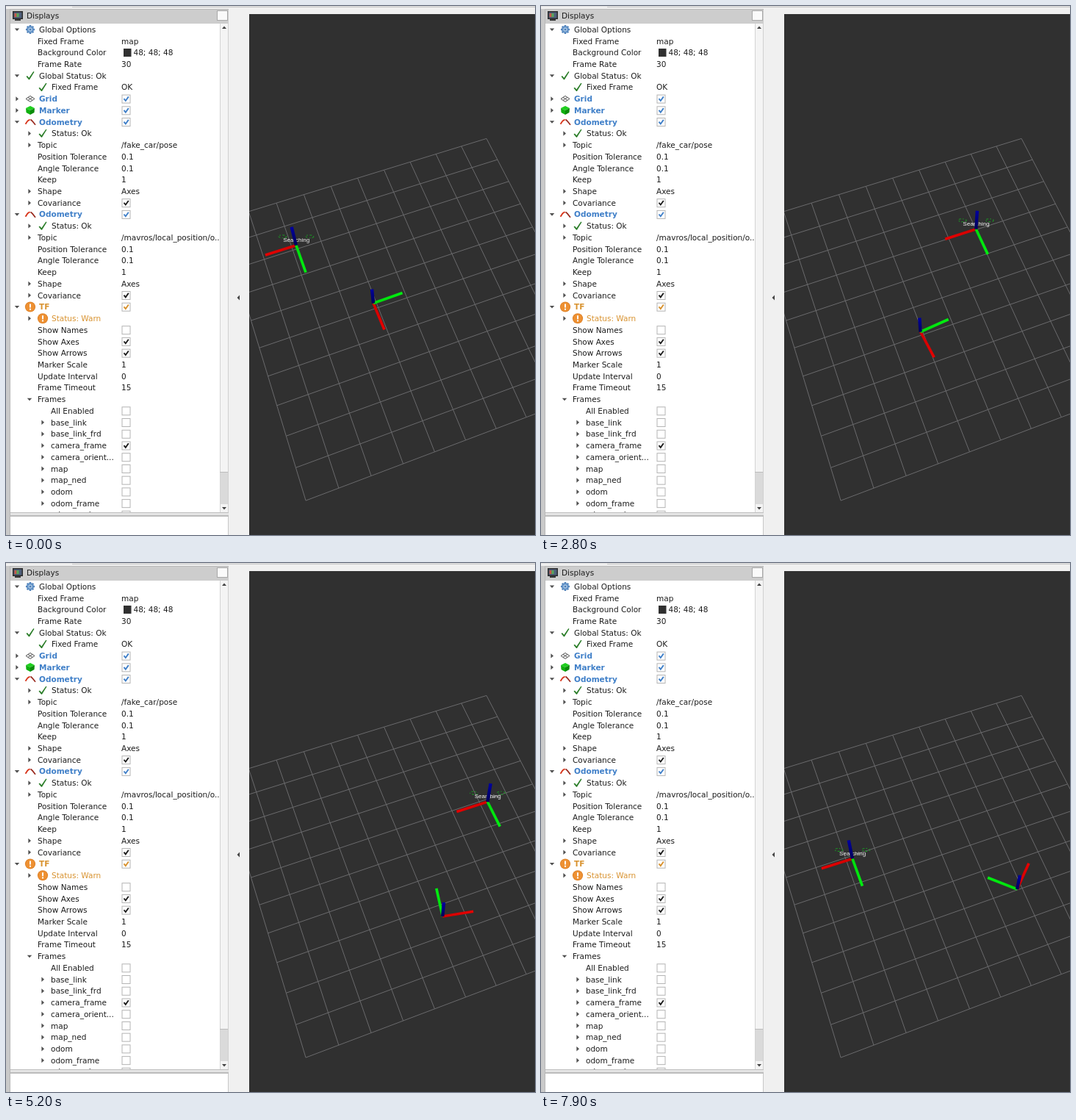
These frames come from a looping animation (720 by 720 pixels, 8 s). An HTML page with a canvas:

```html
<!DOCTYPE html>
<html lang="en">
<head>
<meta charset="utf-8">
<title>Displays</title>
<style>
html, body { margin: 0; width: 100%; height: 100%; overflow: hidden; background: #f0f0f0; }
canvas { position: absolute; left: 0; top: 0; width: 720px; height: 720px; }
</style>
</head>
<body>
<canvas id="back" width="720" height="720"></canvas>
<canvas id="scene" width="720" height="720"></canvas>
<script>
const back = document.getElementById('back').getContext('2d');
const scene = document.getElementById('scene').getContext('2d');
const FONT = '10.5px "DejaVu Sans", sans-serif';
const VIEW = { x: 331, y: 11, w: 389, h: 709 };
const LOOP = 8000, STEP = 100;

function rect(c, x, y, w, h, fill) { c.fillStyle = fill; c.fillRect(x, y, w, h); }
function poly(c, pts, fill) {
  c.beginPath();
  pts.forEach(p => c.lineTo(p[0], p[1]));
  c.closePath();
  c.fillStyle = fill;
  c.fill();
}
function line(c, pts, color, width) {
  c.beginPath();
  pts.forEach(p => c.lineTo(p[0], p[1]));
  c.strokeStyle = color;
  c.lineWidth = width;
  c.stroke();
}
function disc(c, x, y, r, fill) {
  c.beginPath();
  c.arc(x, y, r, 0, 7);
  c.fillStyle = fill;
  c.fill();
}

// ---- property tree ----
const BLUE = '#3f7fc8', ORANGE = '#d8922f', BLACK = '#1c1c1c';
const odometry = topic => [
  ['v', 45, 'path', 'Odometry', BLUE],
  ['>', 62, 'tick', 'Status: Ok'],
  ['>', 43, '', 'Topic', topic],
  ['', 43, '', 'Position Tolerance', '0.1'],
  ['', 43, '', 'Angle Tolerance', '0.1'],
  ['', 43, '', 'Keep', '1'],
  ['>', 43, '', 'Shape', 'Axes'],
  ['>', 43, '', 'Covariance', true]
];
// arrow, text x, icon, label, value (a colour marks a display heading)
const rows = [
  ['v', 45, 'gear', 'Global Options'],
  ['', 43, '', 'Fixed Frame', 'map'],
  ['', 43, '', 'Background Color', '48; 48; 48'],
  ['', 43, '', 'Frame Rate', '30'],
  ['v', 45, 'tick', 'Global Status: Ok'],
  ['', 62, 'tick', 'Fixed Frame', 'OK'],
  ['>', 45, 'grid', 'Grid', BLUE],
  ['>', 45, 'cube', 'Marker', BLUE],
  ...odometry('/fake_car/pose'),
  ...odometry('/mavros/local_position/o..'),
  ['v', 45, 'warn', 'TF', ORANGE],
  ['>', 62, 'warn', 'Status: Warn'],
  ['', 43, '', 'Show Names', false],
  ['', 43, '', 'Show Axes', true],
  ['', 43, '', 'Show Arrows', true],
  ['', 43, '', 'Marker Scale', '1'],
  ['', 43, '', 'Update Interval', '0'],
  ['', 43, '', 'Frame Timeout', '15'],
  ['v', 43, '', 'Frames'],
  ['', 61, '', 'All Enabled', false],
  ...['base_link', 'base_link_frd', 'camera_frame', 'camera_orient...', 'map',
    'map_ned', 'odom', 'odom_frame', 'odom_ned'].map(n => ['>', 61, '', n, n === 'camera_frame'])
];

const icons = {
  gear(c) {
    for (let i = 0; i < 8; i++) {
      const a = i * Math.PI / 4;
      line(c, [[0, 0], [6 * Math.cos(a), 6 * Math.sin(a)]], '#4c7cb4', 2.4);
    }
    disc(c, 0, 0, 5, '#5f90c6');
    disc(c, 0, 0, 2.7, '#a9c6e4');
    disc(c, 0, 0, 1.3, '#4c7cb4');
  },
  tick(c) { poly(c, [[-5.5, 1], [-4, 0], [-1.7, 2.8], [4.3, -5.8], [5.5, -5.2], [-1, 5.3], [-2, 5.3]], '#2a7d28'); },
  grid(c) {
    for (let i = -1; i <= 1; i++) {
      line(c, [[-3 + i * 3, i * 2 + 2], [3 + i * 3, i * 2 - 2]], '#505050', 1);
      line(c, [[-3 + i * 3, -i * 2 - 2], [3 + i * 3, 2 - i * 2]], '#505050', 1);
    }
  },
  cube(c) {
    poly(c, [[-6, -3], [0, -6], [6, -3], [0, 0]], '#1fd01f');
    poly(c, [[-6, -3], [0, 0], [0, 6], [-5.5, 3]], '#10b010');
    poly(c, [[6, -3], [0, 0], [0, 6], [5.5, 3]], '#0a8c0a');
  },
  path(c) {
    line(c, [[-6.5, 3], [-3.5, -1.5], [-.5, -3.4]], '#d8361c', 1.9);
    line(c, [[.5, -3.4], [3, -1], [7, 4]], '#98281c', 1.7);
  },
  warn(c) {
    disc(c, 0, 0, 7.1, '#e0842a');
    disc(c, 0, 0, 6, '#ee9133');
    rect(c, -1, -4, 2, 5, '#fff');
    rect(c, -1, 2.2, 2, 2, '#fff');
  }
};

function arrow(c, kind, x, y) {
  poly(c, kind === 'v' ? [[x - 3.2, y - 1.6], [x + 3.2, y - 1.6], [x, y + 2]]
    : [[x - 1.6, y - 3.2], [x + 2, y], [x - 1.6, y + 3.2]], '#505050');
}
function checkbox(c, y, on, color) {
  rect(c, 157.5, y - 5.8, 12, 12, '#b4b4b4');
  rect(c, 158.5, y - 4.8, 10, 10, '#fff');
  if (on) line(c, [[160.5, y - .2], [162.8, y + 2.6], [166.8, y - 3]], color, 1.9);
}
function text(c, s, x, y, color, bold) {
  c.font = (bold ? 'bold ' : '') + FONT;
  c.fillStyle = color;
  c.fillText(s, x, y + 3.8);
}

function drawRow(c, [arr, x, icon, label, value], i) {
  const y = 32 + i * 15.73;
  const heading = value === BLUE || value === ORANGE;
  if (arr) arrow(c, arr, x === 45 ? 15 : x === 61 ? 50 : 32, y);
  if (icon) {
    c.save();
    c.translate(x === 45 ? 33 : 50, y);
    icons[icon](c);
    c.restore();
  }
  text(c, label, x, y, heading ? value : icon === 'warn' ? ORANGE : BLACK, heading);
  if (heading) checkbox(c, y, true, value);
  else if (typeof value === 'boolean') checkbox(c, y, value, BLACK);
  else if (value) {
    const swatch = label === 'Background Color';
    if (swatch) rect(c, 160, y - 5.5, 10.5, 11, '#303030');
    text(c, value, swatch ? 173.5 : 157, y, BLACK);
  }
}

function drawPanel(c) {
  rect(c, 0, 0, 720, 720, '#f0f0f0');
  rect(c, 0, 0, 720, 1, '#e2e2e2');
  rect(c, 90, 1, 630, 1, '#c8c8c8');
  rect(c, 0, 4, 6, 716, '#c9c9c9');
  rect(c, 5, 4, 1, 716, '#b8b8b8');
  // title bar
  rect(c, 6, 4, 297, 20, '#cdcdcd');
  rect(c, 6, 4, 297, 1, '#b8b8b8');
  rect(c, 287, 6, 15, 14, '#a8a8a8');
  rect(c, 288, 7, 13, 12, '#fafafa');
  rect(c, 9, 7, 14, 11, '#2c2c2c');
  rect(c, 10.5, 8.5, 11, 8, '#50607c');
  rect(c, 11.5, 10, 3, 5, '#c85a4a');
  rect(c, 14.5, 10, 3, 5, '#5aa85a');
  rect(c, 12, 18, 8, 2, '#3a3a3a');
  text(c, 'Displays', 28, 13.6, BLACK);
  // tree
  rect(c, 6, 24, 285, 666, '#fff');
  c.save();
  c.beginPath();
  c.rect(6, 24, 285, 665);
  c.clip();
  rows.forEach((r, i) => drawRow(c, r, i));
  c.restore();
  // scrollbar
  rect(c, 291, 24, 12, 666, '#f4f4f4');
  rect(c, 291, 24, 1, 666, '#d4d4d4');
  rect(c, 292, 634, 11, 44, '#dadada');
  rect(c, 291, 634, 12, 1, '#bcbcbc');
  rect(c, 302, 24, 1, 666, '#d0d0d0');
  poly(c, [[294, 31], [300, 31], [297, 27.5]], '#444');
  poly(c, [[294, 682], [300, 682], [297, 685.5]], '#444');
  // lower box
  rect(c, 6, 689, 297, 1, '#c0c0c0');
  rect(c, 6, 690, 297, 3, '#e4e4e4');
  rect(c, 6, 693, 297, 2, '#bcbcbc');
  rect(c, 6, 695, 297, 25, '#fff');
  rect(c, 302, 695, 1, 25, '#c8c8c8');
  poly(c, [[318, 393.5], [318, 400.5], [314.5, 397]], '#444');
  rect(c, VIEW.x, VIEW.y, VIEW.w, VIEW.h, '#303030');
  drawGrid(c);
}

// ---- ground plane in perspective, s and r run from 0 to 1 ----
function ground(s, r) {
  const p = s * .06426, q = r * -.1641, w = 1 + p + q;
  return [(292 + 6287 * p - 299 * q) / w, (291 - 1549 * p - 1653 * q) / w];
}
function clipView(c) {
  c.beginPath();
  c.rect(VIEW.x, VIEW.y, VIEW.w, VIEW.h);
  c.clip();
}
function drawGrid(c) {
  c.save();
  clipView(c);
  c.translate(0, .5);
  for (let i = 0; i <= 10; i++) {
    line(c, [ground(i / 10, 0), ground(i / 10, 1)], '#6a6a6c', 1);
    line(c, [ground(0, i / 10), ground(1, i / 10)], '#6a6a6c', 1);
  }
  c.restore();
}

// ---- motion ----
// survey path: time, s, r
const survey = [
  [-1, .44, .184], [.05, .203, .184], [.6, .203, .298], [1.5, .4014, .2985], [2.8, .701, .298],
  [4.03, .98, .298], [4.52, .98, .41], [5.9, .669, .41], [7, .423, .41], [8, .198, .411], [8.5, .198, .5]
];
function along(t) {
  let i = 1;
  while (i < survey.length - 1 && t > survey[i][0]) i++;
  const a = survey[i - 1], b = survey[i], k = (t - a[0]) / (b[0] - a[0]);
  return [a[1] + (b[1] - a[1]) * k, a[2] + (b[2] - a[2]) * k];
}
// averaging over a short window rounds the corners
function dronePos(t) {
  let s = 0, r = 0;
  for (let k = -3; k <= 3; k++) {
    const p = along(t + k * .03);
    s += p[0] / 7;
    r += p[1] / 7;
  }
  const [x, y] = ground(s, r);
  return [x, y + .5];
}

// car: time, x, y, heading
const drive = [
  [0, 500, 404.5, 0], [1.5, 509.5, 428.5, 0], [2.8, 516.5, 443.5, .086], [4.4, 591, 481, 1.322],
  [5.9, 597, 481, 1.42], [7, 629, 466, 1.888], [7.9, 648, 444, 2.352]
];
// monotone cubic through column k
function track(t, k) {
  const n = drive.length - 1;
  const rate = i => (drive[i + 1][k] - drive[i][k]) / (drive[i + 1][0] - drive[i][0]);
  const slope = i => {
    if (i === 0) return rate(0);
    if (i === n) return rate(n - 1);
    const a = rate(i - 1), b = rate(i);
    return a * b > 0 ? 2 * a * b / (a + b) : 0;
  };
  let i = 0;
  while (i < n - 1 && t > drive[i + 1][0]) i++;
  const a = drive[i], b = drive[i + 1], h = b[0] - a[0], u = Math.min(1, (t - a[0]) / h);
  const v = 1 - u;
  return a[k] * v * v * (1 + 2 * u) + b[k] * u * u * (3 - 2 * u)
    + h * u * v * (slope(i) * v - slope(i + 1) * u);
}

function bar(c, x, y, dx, dy, from, to, width) {
  const g = c.createLinearGradient(x, y, x + dx, y + dy);
  g.addColorStop(0, from);
  g.addColorStop(1, to);
  line(c, [[x, y], [x + dx, y + dy]], g, width);
}
function axes(c, x, y, red, green, blue) {
  bar(c, x, y, ...red, '#d00000', '#e60000', 3.7);
  bar(c, x, y, ...green, '#00dc0c', '#00ee10', 3.7);
  bar(c, x, y, ...blue, '#000058', '#0000a0', 4.4);
}
function rotor(c, x, y, t) {
  c.save();
  c.setLineDash([3, 2, 1.5, 2.5]);
  c.lineDashOffset = t * 37;
  c.beginPath();
  c.ellipse(x, y, 5.5, 2, .05, 0, 2 * Math.PI);
  c.strokeStyle = '#1c9424';
  c.lineWidth = 1.1;
  c.stroke();
  c.restore();
}

function drawDrone(c, t) {
  const [x, y] = dronePos(t);
  rotor(c, x - 18.5, y - 12, t);
  rotor(c, x + 18.5, y - 12, -t);
  c.font = '8px "Liberation Sans", Arial, sans-serif';
  c.textAlign = 'center';
  c.fillStyle = '#f4f4f4';
  c.fillText('Searching', x + .3, y - 4.6);
  axes(c, x, y, [-42, 13.4],
    [13.2 + (x - 400) * .0145, 37 - (x - 400) * .013 + (y - 340) * .01],
    [(x - 550) * .04, -25]);
}

function drawCar(c, t) {
  const x = track(t, 1), y = track(t, 2), th = track(t, 3);
  const rx = 15 + (x - 501) * .015;
  const dir = a => {
    const s = Math.sin(a), r = Math.cos(a);
    return [39.5 * s + rx * r, -14 * s + 36 * r];
  };
  axes(c, x, y, dir(th), dir(th + Math.PI / 2), [(x - 550) * .04, -19]);
}

function frame(now) {
  const t = Math.floor((now % LOOP) / STEP) * STEP / 1000;
  scene.clearRect(0, 0, 720, 720);
  scene.save();
  clipView(scene);
  drawDrone(scene, t);
  drawCar(scene, t);
  scene.restore();
  requestAnimationFrame(frame);
}

drawPanel(back);
requestAnimationFrame(frame);
</script>
</body>
</html>
```
